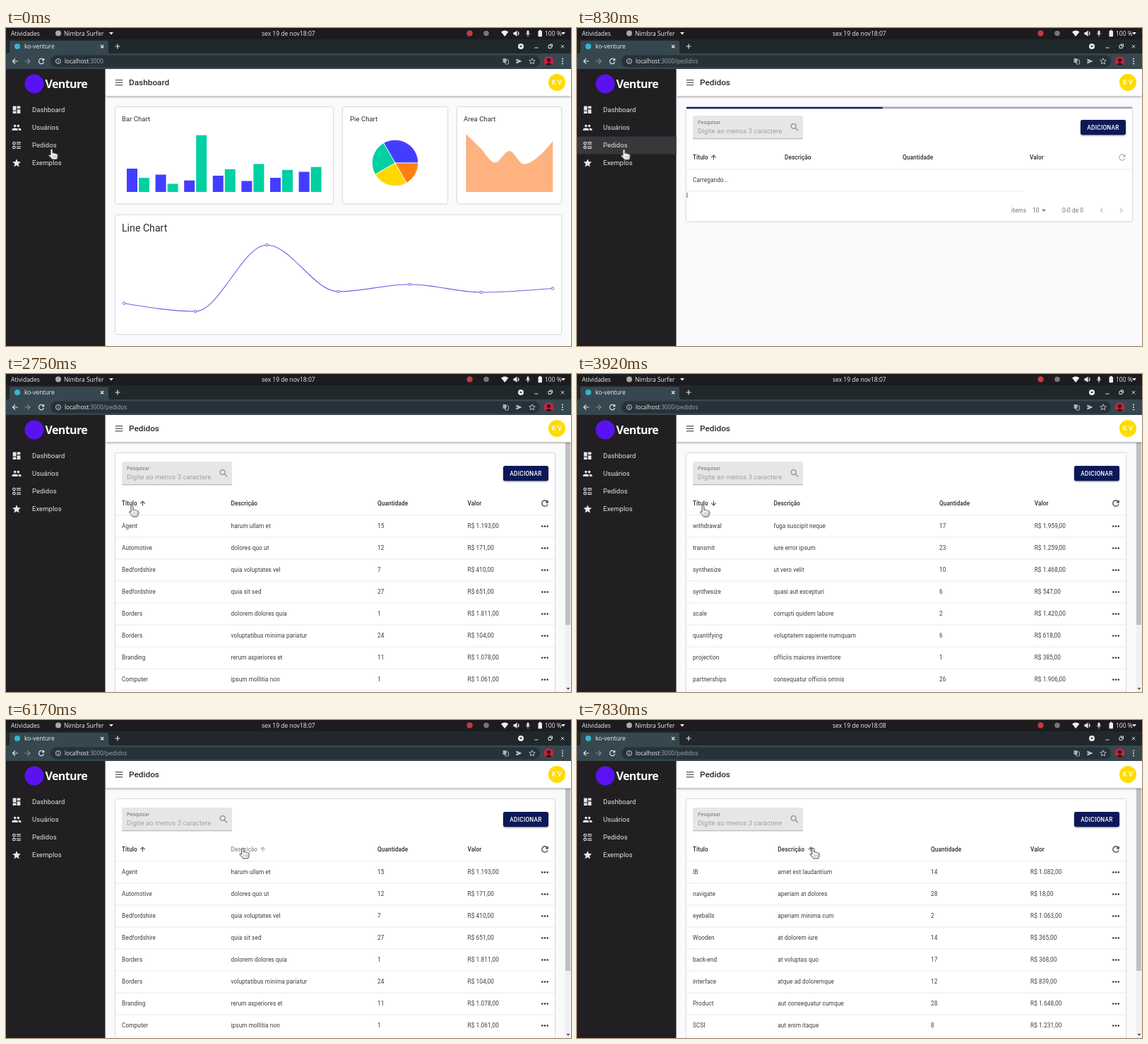
These frames come from a looping animation (800x450 px, 8000 ms). An HTML page:

```html
<!DOCTYPE html>
<html lang="pt-BR">
<head>
<meta charset="utf-8">
<title>ko-venture</title>
<style>
html, body { margin: 0; width: 100%; height: 100%; overflow: hidden; background: #faf9fb; }
#stage { display: block; width: 100vw; height: 100vh; font: 8.26px Roboto, sans-serif; fill: #2b2a2d; }
#stage text { white-space: pre; }
.sys { font-family: "Open Sans", sans-serif; font-size: 8.5px; fill: #eceff1; }
.head { font-weight: 500; letter-spacing: .01em; }
.cell { letter-spacing: .0107em; fill: #3c3b3e; }
.menu { font-size: 9.44px; letter-spacing: .009em; fill: #e6e5e7; }
.title { font-size: 11.8px; font-weight: 500; }
.card { fill: #fff; filter: drop-shadow(0 .7px .9px #0005); }
.line { stroke: #e2e1e4; stroke-width: .7; }
.stroke { fill: none; stroke: #dfe3e6; stroke-width: 1.2; }

/* Page states: hard cuts on one shared 8 s clock */
.dash, .orders, .loading, .data, .asc, .desc, .byDesc, .min7, .min8, .hand, .arrow, .pick, .refresh
  { animation: 8s step-end infinite; }
.dash { animation-name: dash; }
.orders { animation-name: orders; }
.loading { animation-name: loading; }
.data { animation-name: data; }
.asc { animation-name: asc; }
.desc { animation-name: desc; }
.byDesc, .min8 { animation-name: last; }
.min7 { animation-name: first; }
.hand { animation-name: hand; }
.arrow { animation-name: arrow; }
.pick { animation-name: pick; }
.refresh { animation-name: refresh; }
@keyframes dash { 0% { opacity: 1 } 7.25%, to { opacity: 0 } }
@keyframes orders { 0% { opacity: 0 } 7.25%, to { opacity: 1 } }
@keyframes loading { 0%, 15.625%, to { opacity: 0 } 7.25% { opacity: 1 } }
@keyframes data { 0% { opacity: 0 } 15.625%, to { opacity: 1 } }
@keyframes asc { 0%, 44.875%, 90.625%, to { opacity: 0 } 15.625%, 63.625% { opacity: 1 } }
@keyframes desc { 0%, 63.625%, to { opacity: 0 } 44.875% { opacity: 1 } }
@keyframes last { 0% { opacity: 0 } 90.625%, to { opacity: 1 } }
@keyframes first { 0% { opacity: 1 } 90.625%, to { opacity: 0 } }
@keyframes hand { 0%, 31.5%, 75% { opacity: 1 } 24%, 68.5% { opacity: 0 } }
@keyframes arrow { 0%, 31.5%, 75% { opacity: 0 } 24%, 68.5% { opacity: 1 } }
@keyframes pick { 0% { fill: #2b2a2d } 75.6% { fill: #929194 } 82.25%, to { fill: #2b2a2d } }
@keyframes refresh {
  0%, 44.875%, 63.625%, 90.625% { opacity: 1 }
  36.5%, 55.25%, 82.25% { opacity: .35 }
}

.hover { animation: hover 8s linear infinite; }
@keyframes hover { 0%, 1% { opacity: 0 } 4%, 23% { opacity: 1 } 26%, to { opacity: 0 } }

.flip, .peek { transform-box: fill-box; transform-origin: center; }
.flip { animation: flip 8s ease-in-out infinite; }
@keyframes flip {
  0%, 36.5% { transform: none; opacity: 1 }
  39%, 55.25% { transform: rotate(180deg); opacity: 1 }
  57.75%, 82.25% { transform: none; opacity: 1 }
  84%, to { transform: none; opacity: 0 }
}
.peek { animation: peek 8s linear infinite; }
@keyframes peek { 0%, 75.6% { opacity: 0 } 77%, 82.25% { opacity: .5 } 84%, to { opacity: 1 } }

.load { animation: load 8s step-end infinite; }
@keyframes load { 0% { opacity: 1 } 8.375%, to { opacity: 0 } }
.runner { transform-box: fill-box; transform-origin: 0 0; animation: run 8s infinite; }
@keyframes run {
  0% { transform: translateX(-35%) scaleX(.35); animation-timing-function: cubic-bezier(.65, .815, .735, .395) }
  15.75%, to { transform: translateX(100%) scaleX(.9) }
}

#cursor { animation: move 8s ease-in-out infinite; }
@keyframes move {
  0% { transform: translate(64.5px, 171px) }
  10.375%, 21.875% { transform: translate(66.5px, 171.5px) }
  32.5%, 66.625% { transform: translate(178.5px, 186.5px) }
  76%, 90% { transform: translate(335.2px, 181px) }
  93%, to { transform: translate(334.2px, 181px) }
}
</style>
</head>
<body>
<svg id="stage" viewBox="0 0 800 450" preserveAspectRatio="none"></svg>
<script>
const text = (x, y, str, cls = '', extra = '') => `<text x="${x}" y="${y}" class="${cls}" ${extra}>${str}</text>`;
const rect = (x, y, w, h, fill, extra = '') => `<rect x="${x}" y="${y}" width="${w}" height="${h}" fill="${fill}" ${extra}/>`;
const dot = (x, y, r, fill, extra = '') => `<circle cx="${x}" cy="${y}" r="${r}" fill="${fill}" ${extra}/>`;
const path = (d, extra = '') => `<path d="${d}" ${extra}/>`;
const group = (cls, ...parts) => `<g class="${cls}">${parts.join('')}</g>`;
const card = (x, y, w, h) => `<rect x="${x}" y="${y}" width="${w}" height="${h}" rx="2.4" class="card"/>`;
const rule = (x1, x2, y) => path(`M${x1} ${y}H${x2}`, 'class="line"');
// 24-unit icon centred on a point
const icon = (x, y, size, body) => `<g transform="translate(${x} ${y}) scale(${size / 24}) translate(-12 -12)">${body}</g>`;

const ARROW_UP = path('M4 12l1.4 1.4L11 7.8V20h2V7.8l5.6 5.6L20 12l-8-8z');
const REFRESH = path('M17.65 6.35C16.2 4.9 14.2 4 12 4c-4.4 0-8 3.6-8 8s3.6 8 8 8c3.7 0 6.8-2.55 7.7-6h-2.1c-.8 2.3-3 4-5.6 4-3.3 0-6-2.7-6-6s2.7-6 6-6c1.7 0 3.1.7 4.2 1.8L13 11h7V4z');
const STAR = path('M12 17.3l6.2 3.7-1.6-7L22 9.2l-7.2-.6L12 2 9.2 8.6 2 9.2 7.5 14l-1.7 7z');
const sortArrow = (x, cls) => icon(x, 183, 10.6, group(cls, ARROW_UP));

// Monotone cubic through evenly spaced points
function monotone(x0, dx, ys) {
  const n = ys.length, s = ys.slice(1).map((y, i) => (y - ys[i]) / dx);
  const m = ys.map((_, i) => {
    if (!i || i === n - 1) return 0;
    const a = s[i - 1], b = s[i];
    return (Math.sign(a) + Math.sign(b)) * Math.min(Math.abs(a), Math.abs(b), Math.abs(a + b) / 4);
  });
  m[0] = (3 * s[0] - m[1]) / 2;
  m[n - 1] = (3 * s[n - 2] - m[n - 2]) / 2;
  const h = dx / 3;
  return `M${x0} ${ys[0]}` + s.map((_, i) => {
    const x = x0 + i * dx;
    return `C${x + h} ${ys[i] + m[i] * h} ${x + 2 * h} ${ys[i + 1] - m[i + 1] * h} ${x + dx} ${ys[i + 1]}`;
  }).join('');
}

function slice(from, to, fill) {
  const at = deg => [551 + 32.7 * Math.cos(deg * Math.PI / 180), 191 - 32.7 * Math.sin(deg * Math.PI / 180)].join(' ');
  return path(`M551 191L${at(from)}A32.7 32.7 0 0 0 ${at(to)}z`, `fill="${fill}" stroke="#fff" stroke-width=".8"`);
}

function desktop() {
  const light = 'fill="#eceff1"';
  return rect(0, 0, 800, 16, '#1d1b1e') +
    text(7, 11, 'Atividades', 'sys') + dot(74, 7.5, 4, '#a9a9ac') +
    text(82, 11, 'Nimbra Surfer', 'sys') + path('M146 6h6l-3 3.6z', light) +
    text(362, 11, 'sex 19 de nov', 'sys') +
    text(416, 11, '18:07', 'sys min7') + text(416, 11, '18:08', 'sys min8') +
    dot(656.5, 7.5, 4.2, '#c33a40') + dot(680, 7.5, 3.8, '#77757a') +
    path('M701 5.5q5.2-4 10.4 0L706.2 12z', light) +
    path('M718.5 6h2l3-2.6v8.6l-3-2.6h-2z', light) + path('M725 5q2 2.6 0 5.2', 'class="stroke"') +
    rect(737.5, 3.5, 3, 5.5, '#eceff1', 'rx="1.5"') + path('M736 7.5q3 5 6 0M739 10v2.4', 'class="stroke" style="stroke-width:.8"') +
    rect(753.5, 4, 5.5, 8.3, '#eceff1', 'rx=".8"') + rect(755, 2.8, 2.5, 1.3, '#eceff1') +
    text(763, 11, '100 %', 'sys') + path('M786 6h6l-3 3.6z', light);
}

function browser() {
  return rect(0, 16, 800, 20, '#20282c') +
    path('M2 36q3 0 3-3V21q0-3 3-3H142q3 0 3 3v12q0 3 3 3z', 'fill="#37474f"') +
    dot(16, 26, 4, '#35b6d0') + text(26, 29, 'ko-venture', 'sys') +
    path('M134 24l4.4 4.4m0-4.4l-4.4 4.4M154.5 26h7m-3.500-3.500v7', 'class="stroke"') +
    dot(729, 26, 4, '#eceff1') + path('M727 25h4l-2 2.600z', 'fill="#20282c"') +
    path('M748.500 28h5M768 24.500h4v4h-4zM769.500 23h4v4M785.800 24l4.400 4.400m0-4.400l-4.400 4.400', 'class="stroke" style="stroke-width:1"') +
    rect(0, 36, 800, 22, '#37474f') + rect(63, 38.5, 693, 17, '#263238', 'rx="8.500"') +
    path('M17 47H9.500m3.500-3.500L9.500 47l3.500 3.500', 'class="stroke"') +
    path('M26.500 47H34m-3.500-3.500L34 47l-3.500 3.500', 'class="stroke" stroke-opacity=".45"') +
    path('M53 45a3.600 3.600 0 1 0 .5 3M53.600 43v2.600h-2.600', 'class="stroke"') +
    `<circle cx="74" cy="47" r="3.500" class="stroke" style="stroke-width:.9"/>` + path('M74 46.600v2.400M74 44.800v.8', 'class="stroke" style="stroke-width:.9"') +
    `<text x="83" y="50" class="sys" style="font-size:8.150px">localhost<tspan fill="#9fabb1">:3000</tspan><tspan class="orders" fill="#9fabb1"></tspan></text>` +
    group('orders', text(138, 50, '/pedidos', 'sys', 'style="font-size:8.150px;fill:#9fabb1"')) +
    rect(703.5, 43, 5, 6, '#9fabb1', 'rx=".8"') + rect(706.5, 45, 5, 6, 'none', 'rx=".8" stroke="#b8c2c7" stroke-width=".9"') +
    path('M722.500 43.500l8 3.500-8 3.500v-2.700l4-.8-4-.8z', 'fill="#c3ccd0"') +
    `<g fill="none" stroke="#cfd6da" stroke-width="2">${icon(745, 47, 10, STAR)}</g>` +
    dot(768.5, 47, 6.8, '#d4203d') + dot(768.5, 45.5, 2.8, '#251c20') + path('M764 51.500q4.500-5 9 0q-4.500 3.500-9 0z', 'fill="#251c20"') +
    [43.5, 47, 50.5].map(y => dot(788, y, 1, '#e2e6e8')).join('');
}

function sidebar() {
  const items = ['Dashboard', 'Usuários', 'Pedidos', 'Exemplos'];
  const icons = [
    path('M3 13h8V3H3zm0 8h8v-6H3zm10 0h8V11h-8zm0-18v6h8V3z'),
    dot(8, 8, 3, '#e6e5e7') + dot(16, 8, 3, '#e6e5e7') + path('M1 19v-2.500c0-4.600 14-4.600 14 0V19zM17 19h6v-2.500c0-2.300-4.700-3.500-8-3.400q2 1.200 2 3.400z'),
    `<g fill="none" stroke="#e6e5e7" stroke-width="2"><circle cx="6" cy="7" r="3"/><circle cx="6" cy="17" r="3"/><path d="M12 5h10M12 9h10M12 15h10M12 19h10"/></g>`,
    STAR
  ];
  return rect(0, 58, 140.5, 392, '#211f22') +
    dot(40, 79, 13.5, '#5b12f0') +
    text(55.5, 84.8, 'Venture', '', 'style="font:700 16px \'Open Sans\',sans-serif;letter-spacing:-.6px;fill:#fff"') +
    rect(0, 153.5, 140.5, 25, '#39373a', 'class="hover"') +
    items.map((name, i) => text(37, 119 + i * 25.1, name, 'menu') +
      `<g fill="#e6e5e7">${icon(15, 115.8 + i * 25.1, 14.16, icons[i])}</g>`).join('');
}

function header() {
  return rect(140.5, 58, 659.5, 38.3, '#fff', 'style="filter:drop-shadow(0 1px 1.500px #0006)"') +
    path('M154.800 73.700h10.600M154.800 77.200h10.600M154.800 80.700h10.600', 'stroke="#2b2a2d" stroke-width="1.150"') +
    text(174, 81.3, 'Dashboard', 'title dash') + text(174, 81.3, 'Pedidos', 'title orders') +
    dot(780, 77, 12, '#fedc00') + text(780, 80.3, 'K V', '', 'text-anchor="middle" style="font-size:9.440px;font-weight:500;fill:#fff"');
}

function dashboard() {
  const blue = [199, 207.5, 215.7, 209, 216.5, 212, 203.5];
  const green = [212, 220.5, 151.7, 199.8, 192.5, 200.8, 196.7];
  const trend = [389.5, 401, 307, 373, 362.7, 374, 368.5];
  const caption = 'style="font-size:9.440px;letter-spacing:.009em"';
  return card(155, 112, 308, 136.5) + card(477, 112, 148, 136.5) + card(639, 112, 147, 136.5) + card(155, 265, 631, 168) +
    text(164, 132, 'Bar Chart', '', caption) + text(487, 132, 'Pie Chart', '', caption) + text(648, 132, 'Area Chart', '', caption) +
    text(164, 288, 'Line Chart', '', 'style="font-size:14.160px"') +
    blue.map((y, i) => rect(171 + i * 40.6, y, 15, 232 - y, '#433eff') +
      rect(188 + i * 40.6, green[i], 15, 232 - green[i], '#00d0a2')).join('') +
    slice(0, 120, '#433eff') + slice(120, 210, '#00d0a2') + slice(210, 300, '#ffd800') + slice(300, 360, '#ff8010') +
    path(monotone(651.3, 20.5, [150, 170, 190.5, 174, 192.7, 182, 160]) + 'V232H651.300z', 'fill="#fdb280"') +
    path(monotone(167, 101.15, trend), 'fill="none" stroke="#8158e8" stroke-width="1.100"') +
    trend.map((y, i) => dot(167 + i * 101.15, y, 1.8, '#fff', 'stroke="#8158e8" stroke-width="1"')).join('');
}

function progress(start, width) {
  const delay = `style="animation-delay:${start - 8}s"`;
  return `<svg x="155" y="111.800" width="${width}" height="2.400"><g class="load" ${delay}>` +
    rect(0, 0, width, 2.4, '#9fa3bf') + rect(0, 0, width, 2.4, '#0d1754', `class="runner" ${delay}`) + '</g></svg>';
}

function searchBox() {
  return path('M164 157V126.400q0-2.400 2.400-2.400H317.600q2.400 0 2.400 2.400V157z', 'fill="#e6e5e7"') + rect(164, 156.5, 156, .7, '#949396') +
    text(171, 136, 'Pesquisar', '', 'style="font-size:7.080px;letter-spacing:.009em;fill:#716f73"') +
    `<svg x="171" y="138" width="118.800" height="16">${text(0, 11, 'Digite ao menos 3 caracteres', '', 'style="font-size:9.440px;letter-spacing:.009em;fill:#a09fa2"')}</svg>` +
    `<g fill="none" stroke="#929195" stroke-width="1.300"><circle cx="306.700" cy="139" r="3.400"/><path d="M309.200 141.500l3.700 3.700"/></g>`;
}

const addButton = x => rect(x, 130, 64, 21.2, '#0d1857', 'rx="2.400" style="filter:drop-shadow(0 1px 1px #0006)"') +
  text(x + 32, 143.5, 'ADICIONAR', '', 'text-anchor="middle" style="font-weight:500;letter-spacing:.028em;fill:#fff"');

const headings = (cols, picked) => ['Título', 'Descrição', 'Quantidade', 'Valor']
  .map((name, i) => text(cols[i], 186.2, name, i === 1 && picked ? 'head pick' : 'head')).join('');

function loadingPage() {
  const muted = 'style="fill:#747377"';
  return card(155, 112, 631, 161.5) + searchBox() + addButton(713) + headings([164, 294, 461, 641]) +
    `<g opacity=".35">${icon(772, 183, 14.16, REFRESH)}</g>` + rule(155, 786, 200) +
    text(164, 218.3, 'Carregando...', 'cell') + rule(155, 632, 231) + text(155, 240, 'l') +
    text(615, 261, 'items', 'cell', muted) + text(645, 261, '10', 'cell', muted) + path('M658 256.700h6l-3 3z', 'fill="#747377"') +
    text(687, 261, '0-0 de 0', 'cell', muted) +
    path('M744.300 254.800l-3.200 3.200 3.200 3.200M769 254.800l3.200 3.200-3.200 3.200', 'fill="none" stroke="#bdbcc0" stroke-width="1.100"') +
    progress(.58, 631);
}

function table(cls, cols, rows) {
  const body = rows.trim().split('\n').map((row, i) => {
    const [name, about, count, price] = row.trim().split('|');
    return [name, about, count, `R$ ${price},00`].map((v, c) => text(cols[c], 218.3 + i * 31, v, 'cell')).join('');
  }).join('');
  return group(cls, headings(cols, cls === 'asc'), body);
}

function dataPage() {
  const rows = [...Array(8).keys()];
  return card(155, 112, 622, 345) + searchBox() + addButton(704) +
    group('refresh', icon(763, 183, 14.16, REFRESH)) +
    rows.map(i => rule(155, 777, 200 + i * 31) + [759.3, 763, 766.7].map(x => dot(x, 215.5 + i * 31, 1.2, '#2b2a2d')).join('')).join('') +
    rule(155, 777, 448) +
    table('asc', [164, 318.5, 526, 653.5], `
      Agent|harum ullam et|15|1.193
      Automotive|dolores quo ut|12|171
      Bedfordshire|quia voluptates vel|7|410
      Bedfordshire|quia sit sed|27|651
      Borders|dolorem dolores quia|1|1.811
      Borders|voluptatibus minima pariatur|24|104
      Branding|rerum asperiores et|11|1.078
      Computer|ipsum mollitia non|1|1.061`) +
    table('desc', [164, 278.5, 513, 647.7], `
      withdrawal|fuga suscipit neque|17|1.959
      transmit|iure error ipsum|23|1.259
      synthesize|ut vero velit|10|1.468
      synthesize|quasi aut excepturi|6|547
      scale|corrupti quidem labore|2|1.420
      quantifying|voluptatem sapiente numquam|6|618
      projection|officiis maiores inventore|1|385
      partnerships|consequatur officiis omnis|26|1.906`) +
    table('byDesc', [164, 284.3, 501, 642], `
      IB|amet est laudantium|14|1.082
      navigate|aperiam at dolores|28|18
      eyeballs|aperiam minima cum|2|1.063
      Wooden|at dolorem iure|14|365
      back-end|at voluptas quo|17|368
      interface|atque ad doloremque|12|839
      Product|aut consequatur cumque|28|1.648
      SCSI|aut enim itaque|8|1.231`) +
    group('asc', sortArrow(363.5, 'peek')) + group('byDesc', sortArrow(331, '')) +
    [2.92, 4.42, 6.58].map(start => progress(start, 622)).join('') +
    rect(791.5, 96.5, 8.5, 353.5, '#f1f0f2') + rect(792, 97, 7, 258, '#c1c0c3') + path('M793.500 444h5l-2.500 3z', 'fill="#505053"');
}

const cursor = '<g id="cursor" stroke-linejoin="round">' +
  group('hand', path('M-1.500 1q1.500-2 3 0V6q2.200-1 3 .5 2-.6 2.500.8 2-.2 2 1.700 0 3-1.500 6H.500Q-1 12-4.300 9.500q-.4-2.200 2.800-.7z',
    'fill="#f4f3f5" stroke="#343336" stroke-width=".9"'), path('M2 9.500v3M4.300 9.500v3M6.500 9.500v3', 'stroke="#77757a" stroke-width=".6"')) +
  group('arrow', path('M0 0V12l2.800-2.500 1.800 4.200 2-.9-1.800-4H8.500z', 'fill="#252427" stroke="#fff" stroke-width=".8"')) + '</g>';

document.getElementById('stage').innerHTML =
  rect(0, 0, 800, 450, '#faf9fb') +
  group('dash', dashboard()) + group('loading', loadingPage()) + group('data', dataPage()) +
  group('orders', sortArrow(193.5, 'flip')) +
  header() + sidebar() + desktop() + browser() + cursor;
</script>
</body>
</html>
```
